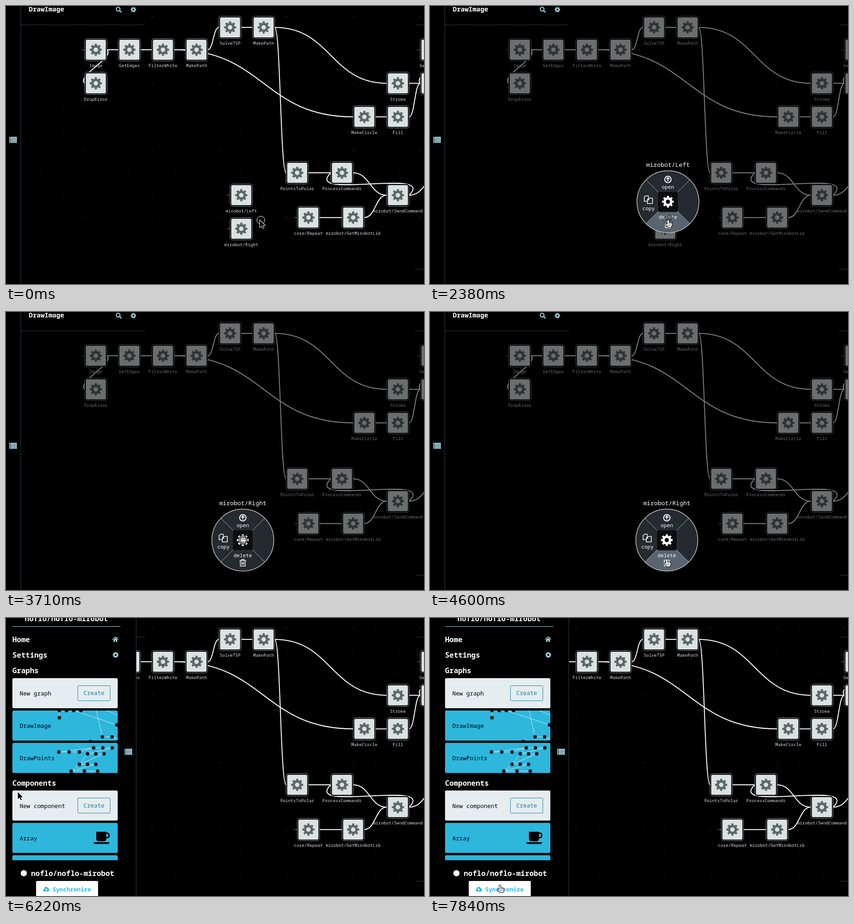
An HTML page with a canvas that plays this animation: 917 by 610 pixels, repeating every 8 s.

```html
<!DOCTYPE html>
<html>
<head>
<meta charset="utf-8">
<style>
html, body { margin: 0; width: 100%; height: 100%; overflow: hidden; background: #000; }
canvas { display: block; }
</style>
</head>
<body>
<canvas id="stage" width="917" height="610"></canvas>
<script>
const ctx = document.getElementById('stage').getContext('2d');
const LOOP = 8000, STEP = 148.1, UNIT = 24.545, SLIDE = 272;
const TEAL = '#2a4146', ICE = '#a9dfea', BLUE = '#2db7dd', PALE = '#e6edf0', INK = '#1c7c9c';

// Nodes sit on a grid; each chain links its nodes from left to right
const nodes = {}, edges = [];
function chain(col, row, gap, ids) {
  ids.split(' ').forEach((id, i, all) => {
    nodes[id] = { col: col + i * gap, row, label: id.split('#')[0] };
    if (i) edges.push([all[i - 1], id]);
  });
}
chain(0, 0, 3, 'Image GetEdges FilterWhite MakePath');
chain(12, -2, 3, 'SolveTSP MakePath#2');
chain(0, 3, 0, 'DropError');
chain(27, 3, 3, 'Stroke Draw');
chain(24, 6, 3, 'MakeCircle Fill');
chain(18, 11, 4, 'PointsToPolar ProcessCommands');
chain(19, 15, 4, 'core/Repeat mirobot/GetMirobotLib');
chain(27, 13, 5, 'mirobot/SendCommand');
chain(30, 0, 0, 'GetCanvas');
chain(32, 11, 0, 'Result');
chain(13, 13, 0, 'mirobot/Left');
chain(13, 16, 0, 'mirobot/Right');
const links = 'Image>DropError MakePath>SolveTSP FilterWhite>MakeCircle MakePath#2>Stroke ' +
  'MakePath#2>PointsToPolar Fill>Draw GetCanvas>Draw ProcessCommands>mirobot/SendCommand ' +
  'mirobot/GetMirobotLib>mirobot/SendCommand mirobot/SendCommand>ProcessCommands mirobot/SendCommand>Result';
edges.push(...links.split(' ').map(s => s.split('>')));
const inlets = ['Image', 'core/Repeat', 'GetCanvas', 'mirobot/Left', 'mirobot/Right'];

const ARROW = 'M-2 0v15.5l3.6-3.4 2.6 5.6 2.4-1.1-2.6-5.4h5z';
const POINT = 'M-2 1.5q1.5-3 3 0v5q2-1.2 2.5.2q2-1 2.5.6q2-.6 2 1.5l-.5 3.5-1.5 4h-7l-4.5-6q0-2.2 2-1.2l1.5 1.6z';
const GRAB = 'M-6 0q.5-2 2.2-.5v-4q1.4-1.6 2.4 0q1.1-2 2.6-.3q2-1.2 2.4.6q2-.6 2.2 1.6v4.4l-2 5h-6z';

// Cursor stops: step, x, y and the shape from there on
const stops = [
  [0, 559, 470, ARROW], [2, 708, 216, ARROW], [4, 523, 429, GRAB], [11, 523, 429, POINT],
  [14, 523, 469, POINT], [18, 523, 469, GRAB], [20, 520, 500, GRAB], [27, 520, 500, POINT],
  [30, 520, 542, POINT], [32, 520, 542, ARROW], [34, 520, 542, ARROW], [37, 44, 398, ARROW],
  [39, 15, 296, ARROW], [40, 15, 296, ARROW], [42, 28, 382, ARROW], [49, 154, 586, POINT], [54, 154, 586, POINT],
];
// First and last step of each mouse press
const presses = [[0, 0], [6, 10], [16, 18], [21, 25], [39, 39], [52, 52]];
const menus = [
  { id: 'mirobot/Left', x: 522, y: 429.5, open: 9, hover: 13, close: 18 },
  { id: 'mirobot/Right', x: 519.5, y: 500.5, open: 25, hover: 29, close: 32 },
];

const gx = col => 197.05 + col * UNIT, gy = row => 96 + row * UNIT;
const clamp = v => Math.min(1, Math.max(0, v));

function at(x, y, draw) {
  ctx.save();
  ctx.translate(x, y);
  draw();
  ctx.restore();
}
function fill(d, color) {
  ctx.fillStyle = color;
  ctx.fill(new Path2D(d));
}
function stroke(d, color, width = 1) {
  ctx.strokeStyle = color;
  ctx.lineWidth = width;
  ctx.stroke(new Path2D(d));
}
function rect(x, y, w, h, color) {
  ctx.fillStyle = color;
  ctx.fillRect(x, y, w, h);
}
function paint(color, line, width) {
  if (color) { ctx.fillStyle = color; ctx.fill(); }
  if (line) { ctx.strokeStyle = line; ctx.lineWidth = width; ctx.stroke(); }
}
function box(x, y, w, h, r, color, line) {
  ctx.beginPath();
  ctx.roundRect(x, y, w, h, r);
  paint(color, line, 1);
}
function disc(x, y, r, color, line, width = 1) {
  ctx.beginPath();
  ctx.arc(x, y, r, 0, 7);
  paint(color, line, width);
}
function text(s, x, y, size, color, align = 'left', weight = 400) {
  ctx.font = `${weight} ${size}px "Noto Sans Mono", "DejaVu Sans Mono", monospace`;
  ctx.textAlign = align;
  ctx.fillStyle = color;
  ctx.fillText(s, x, y);
}
function gear(x, y, r, color) {
  ctx.beginPath();
  for (let i = 0; i < 32; i++) {
    const tip = i % 4 === 1 || i % 4 === 2;
    const side = i % 4 < 2 ? -1 : 1;
    const a = (i >> 2) * Math.PI / 4 + side * (tip ? .17 : .24), k = tip ? r : r * .75;
    ctx.lineTo(x + k * Math.cos(a), y + k * Math.sin(a));
  }
  ctx.closePath();
  ctx.moveTo(x + r * .36, y);
  ctx.arc(x, y, r * .36, 0, 7);
  ctx.fillStyle = color;
  ctx.fill('evenodd');
}

function drawNode({ col, row, label }) {
  const x = gx(col), y = gy(row);
  box(x - 24.5, y - 24.5, 49, 49, 5, '#000', '#8a8f90');
  box(x - 22, y - 22, 44, 44, 3, '#dae2e3');
  gear(x, y, 13.5, '#5d6769');
  text(label, x, y + 38, 9.55, '#dcdcdc', 'center');
}

// Forward edges ease across; backward ones stick out at both ends
function drawEdge([from, to]) {
  const a = nodes[from], b = nodes[to];
  const x1 = gx(a.col) + UNIT, y1 = gy(a.row), x2 = gx(b.col) - UNIT, y2 = gy(b.row);
  const back = x2 < x1, out = back ? (x1 - x2) * .36 : (x2 - x1) / 2;
  const bend = back ? Math.sign(y2 - y1) * out : 0;
  stroke(`M${x1} ${y1}C${x1 + out} ${y1 + bend} ${x2 - out} ${y2 - bend} ${x2} ${y2}`, '#fff', 2);
}

function graph(n) {
  for (let i = 0; i < 18; i++)
    for (let j = 0; j < 12; j++) {
      const x = 75 + i * 2 * UNIT, y = 23 + j * 2 * UNIT;
      const bright = i % 3 === 2 && j % 3 === 0;
      if (x > 305 || j) rect(Math.floor(x), Math.floor(y), 1, 1, bright ? '#aaa' : '#505050');
    }
  const gone = menus.filter(m => n >= m.open).map(m => m.id);
  const live = Object.keys(nodes).filter(id => !gone.includes(id));
  for (const id of inlets)
    if (live.includes(id)) stroke(`M${gx(nodes[id].col) - 31} ${gy(nodes[id].row)}h7`, '#8a8f90');
  edges.forEach(drawEdge);
  live.forEach(id => drawNode(nodes[id]));
}

function drawMenu(title, hot) {
  const label = (s, x, y) => text(s, x, y, 11.3, '#fff', 'center');
  text(title, 0, -77, 13.3, '#fff', 'center');
  disc(0, 0, 68, 'rgba(40,45,52,.94)');
  if (hot) fill('M0 0L48.1 48.1A68 68 0 0 1 -48.1 48.1Z', '#596471');
  stroke('M-48 -48L48 48M48 -48L-48 48', '#aeb2b5');
  disc(0, 0, 68, null, '#c4c6c8', 1.5);
  box(-22.5, -22.5, 45, 45, 5, '#0b0d0f', '#3a3f45');
  gear(0, 0, 13, '#fff');
  disc(0, -49, 7, null, '#fff', 2);
  stroke('M0 -45v-8M-3.5 -49.5L0 -53L3.5 -49.5', '#fff', 2);
  label('open', 0, -29);
  stroke('M-45 -1h-7v-9l3-3h6v4M-45 4v-9l3-3h8v12zM-42 -8v4h-3', '#fff', 1.5);
  label('copy', -42.5, 18);
  label('delete', 0, 37);
  stroke('M-7 45h14M-3 45v-2.5h6v2.5M-5.5 45v12h11v-12M-2.5 48v6M0 48v6M2.5 48v6', '#fff', 1.4);
}

function topBar() {
  text('DrawImage', 50, 12, 14.4, '#fff', 'left', 600);
  disc(246, 7, 4.2, null, ICE, 2);
  stroke('M249 10l4.5 4', ICE, 2.2);
  gear(279.5, 8, 6, ICE);
  ctx.setLineDash([1, 1]);
  stroke('M33 41.5H305M899 41.5H917M899 577.5H917', '#4d7f88');
  ctx.setLineDash([]);
}

// Miniature of a graph, made of dots and straight links
function thumb(dots, lines) {
  lines.forEach(([a, b]) => stroke(`M${a}L${b}`, '#c5eaf5'));
  dots.forEach(([x, y]) => disc(x, y, 4, '#10191c'));
}
function imageThumb() {
  const spot = ({ col, row }) => [136 + col * 5.25, row * 5.25];
  thumb(Object.values(nodes).map(spot), edges.map(e => e.map(id => spot(nodes[id]))));
}
function pointsThumb() {
  // Rows of dots: x, y, gap; each row also hangs on the one before
  const rows = [[135, 20, 22.5], [211, 11, 20.5], [198, 24, 18], [180, 47, 18], [162, 62, 29]];
  const dots = rows.flatMap(([x, y, gap]) => [0, 1, 2].map(i => [x + i * gap, y]));
  const lines = dots.flatMap((d, i) => i % 3 ? [[dots[i - 1], d]] : i ? [[dots[i - 1], d], [dots[i - 3], d]] : []);
  thumb(dots, lines);
}

function card(y, label, picture) {
  box(33, y, 231, 66, 3, picture ? BLUE : PALE);
  text(label, 49, y + 38, 12.8, '#000');
  if (picture) at(0, y, () => {
    ctx.beginPath();
    ctx.rect(33, 0, 231, 66);
    ctx.clip();
    picture();
  });
  else {
    box(176.5, y + 16.5, 71, 33, 2, null, INK);
    text('Create', 212, y + 37, 12.8, INK, 'center', 500);
  }
}
function cup() {
  fill('M217 19.5h22v15q0 6-6 6h-10q-6 0-6-6zM211 42.5h35q0 4-5 4h-25q-5 0-5-4z', '#000');
  stroke('M238 22.5h3q4 0 4 5t-4 5h-3', '#000', 3);
}

function sidebar() {
  const bold = (s, x, y, align) => text(s, x, y, 16, '#fff', align, 600);
  rect(0, 0, 304, 610, '#000');
  stroke('M304.5 0V610', TEAL);
  bold('noflo/noflo-mirobot', 151.5, 7, 'center');
  stroke('M33 18.5H270', ICE);
  ['Home', 'Settings', 'Graphs'].forEach((s, i) => bold(s, 33, 53 + i * 34));
  bold('Components', 33, 368);
  fill('M255 47.5l4-3.5 4 3.5v5h-3v-3.5h-2v3.5h-3z', ICE);
  stroke('M252.5 47.5L259 41.5L265.5 47.5M263 42v3', ICE, 1.6);
  gear(259.5, 81, 6.5, ICE);

  const pitch = 71, graphs = 132, components = 378.5;
  card(graphs, 'New graph');
  card(graphs + pitch, 'DrawImage', imageThumb);
  card(graphs + 2 * pitch, 'DrawPoints', pointsThumb);
  card(components, 'New component');
  card(components + pitch, 'Array', cup);
  box(33, components + 2 * pitch, 231, 11, [3, 3, 0, 0], BLUE);

  disc(58, 560, 6.8, '#fff');
  bold('noflo/noflo-mirobot', 74, 566);
  box(85, 577, 136, 40, 2, '#fff');
  fill('M103 600q-3-1-2.5-3.5q.5-2 2.5-2.2q0-4.3 4-4.3q3 0 4 3q2.5 0 2.5 2.5q1 .5 .5 2.5q-.5 2-2.5 2z', BLUE);
  stroke('M107 599v-4.5M104.8 596.5L107 594.2L109.2 596.5', '#fff', 1.4);
  text('Synchronize', 121, 600, 12.8, BLUE, 'left', 600);

  for (let i = 0; i < 4; i++) {
    rect(279, 287 + i * 3.4, 2.4, 2.6, ICE);
    rect(282, 287 + i * 3.4, 14, 2.6, ICE);
  }
}

function cursor(n) {
  const next = stops.findIndex(s => s[0] > n);
  const [n0, x0, y0, shape] = stops[next - 1], [n1, x1, y1] = stops[next];
  const p = (n - n0) / (n1 - n0);
  at(x0 + (x1 - x0) * p, y0 + (y1 - y0) * p, () => {
    if (presses.some(([a, b]) => n >= a && n <= b)) {
      disc(0, 0, 9, 'rgba(0,0,0,.3)', '#000', 2.5);
      disc(0, 0, 8.7, null, '#fff');
    }
    ctx.lineJoin = 'round';
    stroke(shape, shape === ARROW ? '#fff' : '#000', 2);
    fill(shape, shape === ARROW ? '#000' : '#fff');
    if (shape === GRAB) stroke('M-1.4 -4v4M1.2 -4v4M3.6 -3.5v4M-2 3v3M0 3v3M2 3v3', '#000', .8);
    if (shape === POINT) stroke('M1 6v3M3.5 7v3M6 8v2M-1 11v3M1.5 11v3M4 11v3', '#000', .8);
  });
}

function draw(time) {
  const n = Math.min(53, Math.floor((time % LOOP + 10) / STEP));
  const menu = menus.find(m => n >= m.open && n < m.close);
  rect(0, 0, 917, 610, '#000');
  graph(n);
  if (menu) rect(0, 0, 917, 610, 'rgba(0,0,0,.51)');
  topBar();
  if (menu) at(menu.x, menu.y, () => drawMenu(menu.id, n >= menu.hover));
  const shut = (1 - clamp((n - 40) / 3.4)) ** 3;
  at(-Math.round(SLIDE * shut), 0, sidebar);
  cursor(n);
}

const start = performance.now();
function tick() {
  draw(performance.now() - start);
  requestAnimationFrame(tick);
}
tick();
</script>
</body>
</html>
```
